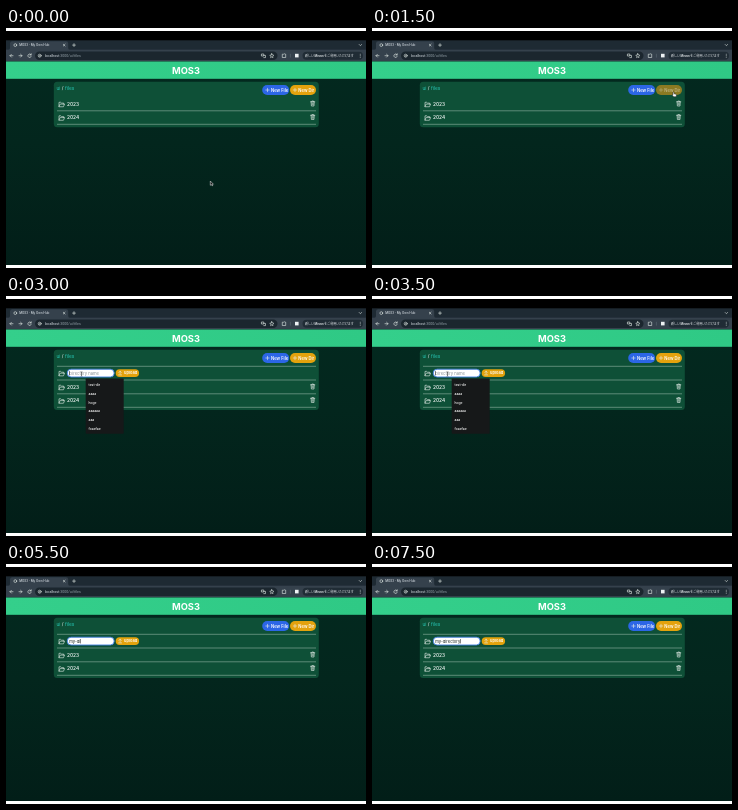
These frames come from a looping animation (360x240 px, 8000 ms). An HTML page:

```html
<!DOCTYPE html>
<html lang="en">
<head>
<meta charset="utf-8">
<title>File manager demo</title>
<style>
  html, body { margin: 0; width: 100%; height: 100%; overflow: hidden; background: #fff; }
  svg { display: block; width: 360px; height: 240px; }
  text { font-family: Inter, "Noto Sans", sans-serif; fill: #fff; }
  .ui { font: 3.3px Roboto, "Noto Sans CJK JP", "Noto Sans CJK", sans-serif; fill: #dce3e8; }
  .jp { font: 500 2.95px Roboto, "Noto Sans CJK JP", "Noto Sans CJK", sans-serif; fill: #eef2f4; }
  .line { fill: none; stroke: #e4ece8; stroke-width: .6; stroke-linecap: round; stroke-linejoin: round; }
  .btn { font-size: 4.2px; font-weight: 600; }
  .row { font-size: 4.8px; font-weight: 500; }
  .path { font-size: 4.8px; fill: #26c6b4; }
  .item { font-size: 3.3px; font-weight: 500; }
  .rule { stroke: #7fa594; stroke-width: .7; }
  .pointer { fill: #111; stroke: #eee; stroke-width: .5; stroke-linejoin: round; }
</style>
</head>
<body>
<svg viewBox="0 0 360 240">
  <defs>
    <linearGradient id="page" x1="0" y1="0" x2="0" y2="1">
      <stop offset="0" stop-color="#03291f"/>
      <stop offset=".4" stop-color="#03261d"/>
      <stop offset="1" stop-color="#021e18"/>
    </linearGradient>
    <linearGradient id="head" x1="0" y1="0" x2="1" y2="0">
      <stop offset="0" stop-color="#34cf8b"/>
      <stop offset="1" stop-color="#2fc985"/>
    </linearGradient>
    <path id="folder" class="line" d="M.3 4.6V.5H2l.8.8H5v1M.3 4.6 1.4 2.3H5.9L4.9 4.6Z"/>
    <path id="trash" class="line" d="M.2 1H4.4M1.5 1V.2H3.1V1M.7 1 1 5.2H3.6L3.9 1M1.8 2.2V4M2.8 2.2V4"/>
    <g id="record">
      <use href="#folder" x="52.7" y="-2.2"/>
      <use href="#trash" x="304.4" y="-3.2"/>
      <path class="rule" d="M51 6.8H310"/>
    </g>
  </defs>

  <rect y="3" width="360" height="234" fill="#000"/>

  <!-- browser -->
  <rect y="12.3" width="360" height="10" fill="#1e2a33"/>
  <rect y="21.7" width="360" height="12" fill="#35414c"/>
  <path fill="#35414c" d="M2 22.2Q4 22 4 20V15.5Q4 13.3 6.2 13.3H60Q62.2 13.3 62.2 15.5V20Q62.2 22 64.2 22.2Z"/>
  <circle class="line" cx="9.3" cy="17.1" r="1.4"/>
  <text class="ui" x="13.2" y="18.3">MOS3 - My Own Hub</text>
  <path class="line" d="M57.3 16.2l1.8 1.8m0-1.8-1.8 1.8M66.6 17.1h2.8m-1.4-1.4v2.8M353.2 16.5l1.2 1.2 1.2-1.2"/>
  <path class="line" d="M7 27.7H4m1.4-1.4L4 27.7l1.4 1.4M13 27.7h3m-1.4-1.4 1.4 1.4-1.4 1.4M25 26.8a1.7 1.7 0 1 0 .2 1.5M25.2 25.7v1.3h-1.3"/>
  <rect x="29" y="23.5" width="242.5" height="8.4" rx="4.2" fill="#1b262e"/>
  <circle class="line" cx="33.7" cy="27.7" r="1.5"/>
  <path class="line" d="M33.7 27.4v.9"/>
  <text class="ui" style="font-size:3.6px" x="38.7" y="29">localhost<tspan fill="#95a2aa">:3000/ui/files</tspan></text>
  <path class="line" d="M255.8 26h2v2h-2zM257.8 27.4h1.7v2.2h-1.7M265.8 25.7l.6 1.3 1.4.2-1 1 .2 1.4-1.2-.7-1.2.7.2-1.4-1-1 1.4-.2z"/>
  <path class="line" d="M276.7 26.2h1a.7.7 0 0 1 1.2 0h.8v3.3h-3z"/>
  <path stroke="#64717b" stroke-width=".5" d="M284.4 25.8v3.8"/>
  <rect x="289" y="25.8" width="3.6" height="3.6" fill="#eef2f4"/>
  <rect x="296.5" y="23.7" width="60.5" height="8" rx="4" fill="#202c35"/>
  <text class="jp" x="299" y="28.8">新しい Mirvan をご利用いただけます</text>
  <path class="line" d="M354.3 26.2v.1m0 1.4v.1m0 1.4v.1"/>

  <!-- page -->
  <rect y="33.5" width="360" height="203.5" fill="url(#page)"/>
  <rect y="33.5" width="360" height="17.3" fill="url(#head)"/>
  <text x="180" y="45.8" text-anchor="middle" font-size="9.3" font-weight="700">MOS3</text>

  <rect id="card" x="47.8" y="53.8" width="265" height="45.5" rx="3.5" fill="#0e5037"/>
  <text class="path" x="50.5" y="62.2">ui <tspan fill="#fff">/</tspan> files</text>

  <rect x="256.2" y="57" width="27" height="10" rx="5" fill="#2c66e6"/>
  <path class="line" d="M259.8 62h3.4m-1.7-1.7v3.4"/>
  <text class="btn" x="265" y="63.5">New File</text>
  <g id="newDir">
    <rect id="newDirBg" x="284" y="57" width="26" height="10" rx="5" fill="#e3a20d"/>
    <g id="newDirInk">
      <path class="line" d="M287.3 62h3.4m-1.7-1.7v3.4"/>
      <text class="btn" x="292.3" y="63.5">New Dir</text>
    </g>
  </g>

  <g id="form">
    <path class="rule" d="M51 70.3H310M51 84H310"/>
    <use href="#folder" x="52.7" y="74.9"/>
    <rect id="field" x="61.2" y="73.2" width="47" height="7.8" rx="3.9" fill="#fff"/>
    <text id="entry" x="63.3" y="78.6" font-size="4.1"></text>
    <rect id="caret" y="75" width=".5" height="4.4" fill="#111"/>
    <rect x="109.7" y="73.2" width="23.4" height="7.8" rx="3.9" fill="#e3a20d"/>
    <path class="line" d="M112.6 78.9h3M114.1 78V75.2m-1.2 1.2 1.2-1.2 1.2 1.2"/>
    <text class="btn" style="font-size:4px" x="118" y="78.4">upload</text>
  </g>

  <g id="rows">
    <use href="#record" y="76"/>
    <text class="row" x="61" y="77.8">2023</text>
    <use href="#record" y="89.5"/>
    <text class="row" x="61" y="91.3">2024</text>
  </g>

  <g id="menu">
    <rect x="79.7" y="82.4" width="38" height="55.4" rx=".8" fill="#161819"/>
  </g>

  <path id="arrow" class="pointer" d="M0 0V4.3L1 3.4 1.7 4.9 2.4 4.6 1.8 3.2H3.1Z"/>
  <path id="hand" class="pointer" style="fill:#fff;stroke:#222" d="M.5 0Q1.1 0 1.1.6V1.8L3 2.2Q3.6 2.4 3.5 3L3.1 4.8H.6L-.8 2.9Q-.6 2.2 0 2.8V.6Q0 0 .5 0Z"/>
  <path id="beam" fill="none" stroke="#222" stroke-width=".5" d="M-.8-2.3Q0-2.3 0-1.7V1.7Q0 2.3-.8 2.3M.8-2.3Q0-2.3 0-1.7M0 1.7Q0 2.3.8 2.3"/>
</svg>
<script>
const $ = id => document.getElementById(id);
const show = (id, on) => $(id).setAttribute("display", on ? "inline" : "none");
const set = (id, attrs) => {
  for (const k in attrs) $(id).setAttribute(k, attrs[k]);
};

["test-dir", "aaaa", "hoge", "aaaaaa", "aaa", "foaefae"].forEach((label, i) => {
  const t = document.createElementNS("http://www.w3.org/2000/svg", "text");
  t.textContent = label;
  t.setAttribute("class", "item");
  t.setAttribute("x", 82.6);
  t.setAttribute("y", 90 + i * 8.75);
  $("menu").append(t);
});

// One pose per half second; typed text implies an open, focused form.
const STEP = 500, LOOP = 8000;
const poses = [
  { pointer: "arrow", at: [204.3, 153] },
  { pointer: "arrow", at: [292, 72] },
  { pointer: "hand", at: [301, 64], hover: true },
  { pointer: "hand", at: [301, 64], hover: true },
  { pointer: "arrow", at: [159.3, 70], form: true },
  { pointer: "beam", at: [75.5, 78], form: true },
  { pointer: "beam", at: [75.5, 78], form: true, focus: true, menu: true },
  { pointer: "beam", at: [75.5, 78], form: true, focus: true, menu: true },
  ...["m", "my", "my-", "my-di", "my-dir", "my-direc", "my-directo", "my-directory"]
    .map(text => ({ text, form: true, focus: true }))
];

function pose({ pointer, at, hover, form, focus, menu, text }) {
  show("form", form);
  show("menu", menu);
  set("card", { height: form ? 60.3 : 45.5 });
  set("rows", { transform: `translate(0 ${form ? 15 : 0})` });
  set("newDirBg", { fill: hover ? "#8b7a22" : "#e3a20d" });
  set("newDirInk", { opacity: hover ? .45 : 1 });
  set("field", { stroke: focus ? "#3f7de0" : "none", "stroke-width": .9 });

  const entry = $("entry");
  entry.textContent = text || "Directory name";
  entry.style.fill = text ? "#17211d" : "#858d92";
  show("caret", focus);
  if (focus) set("caret", { x: 63.4 + (text ? entry.getComputedTextLength() : 0) });

  for (const id of ["arrow", "hand", "beam"]) show(id, id === pointer);
  if (pointer) set(pointer, { transform: `translate(${at})` });
}

let last = -1;
function tick() {
  const step = Math.floor(performance.now() % LOOP / STEP);
  if (step !== last) pose(poses[last = step]);
  requestAnimationFrame(tick);
}
tick();
</script>
</body>
</html>
```
